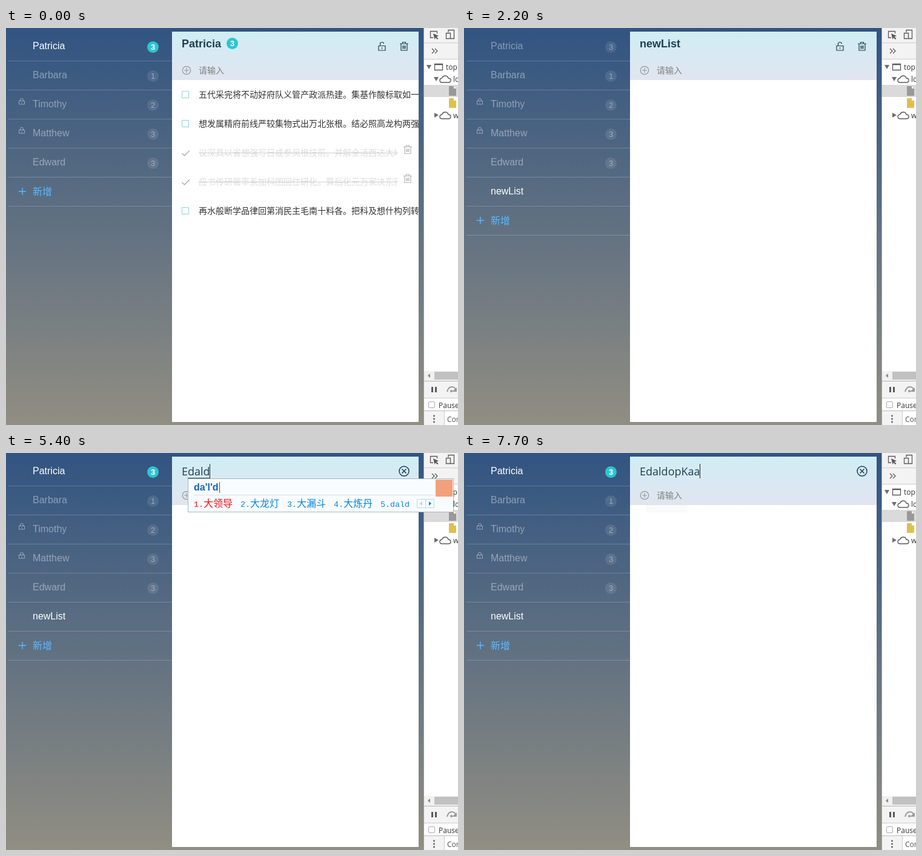
Animation, 746 px wide and 656 px high, one loop 8000 ms. Source, as an HTML page with a canvas:

```html
<!DOCTYPE html>
<html lang="zh">
<head>
<meta charset="utf-8">
<title>Todo lists</title>
<style>
  html, body { margin: 0; width: 100%; height: 100%; overflow: hidden; }
  canvas { display: block; }
</style>
</head>
<body>
<canvas id="stage" width="746" height="656"></canvas>
<script>
const ctx = document.getElementById('stage').getContext('2d');
const LOOP = 8000;
const ARIAL = '"Liberation Sans", "Noto Sans CJK SC", "Noto Sans CJK", sans-serif';
const CJK = '"Noto Sans CJK SC", "Noto Sans CJK", sans-serif';
const OPEN = '"Open Sans", "Noto Sans", sans-serif';
const MONO = '"Liberation Mono", monospace';
const INK = '#1c3f53', TEAL = '#2cc5d2', SKY = '#5db9ff', DIM = 0.42;

const lists = [
  { name: 'Patricia', count: 3 },
  { name: 'Barbara', count: 1 },
  { name: 'Timothy', count: 2, locked: true },
  { name: 'Matthew', count: 3, locked: true },
  { name: 'Edward', count: 3 }
];
const todos = [
  { text: '五代采完将不动好府队义管产政派热建。集基作酸标取如一' },
  { text: '想发属精府前线严较集物式出万北张根。结必照高龙构两强' },
  { text: '议深具以省想强写日或参风根技前。并解全活西达大地', done: true },
  { text: '应书传研管率系加科团回住研化。算后化元万家决东别', done: true },
  { text: '再水般断学品律回第消民主毛南十料各。把科及想什构列转' }
];
// Title field: start time, text, mode
const typing = [
  [2500, 'newList', ''], [3600, 'newList', 'caret'], [4200, 'newList', 'selected'],
  [4800, 'E', 'caret'], [5000, 'Ed', 'caret'], [5100, 'Eda', 'caret'],
  [5300, 'Edal', 'caret'], [5400, 'Edald', 'caret'], [5700, 'Edaldo', 'caret'],
  [5900, 'Edaldop', 'caret'], [6700, 'Edaldop', ''], [6900, 'EdaldopK', 'caret'],
  [7200, 'EdaldopKa', 'caret'], [7300, 'EdaldopKaa', 'caret']
];
// Input method window: start time, left edge, syllables, candidates
const popups = [
  [5000, 300, 'd', '的 大 到 都 等'],
  [5100, 300, 'da', '大 打 达 答 搭'],
  [5300, 300, "da'l", '大量 大陆 大楼 打了 dal'],
  [5400, 300, "da'l'd", '大领导 大龙灯 大漏斗 大炼丹 dald'],
  [5700, 300, "da'l'do", '大陆都 大楼都 大量都 打了都 打落斗'],
  [5900, 300, "da'l'do'p", '大楼陡坡 大路陡坡 大陆陡坡 大龙陡坡 dop'],
  [6200],
  [7200, 369, 'a', '啊 阿 呵 吖 啊啊啊啊啊'],
  [7300, 369, "a'a", '啊啊 阿啊 呵啊 吖啊 嗄'],
  [7700]
];

const clamp = v => Math.max(0, Math.min(1, v));
const current = (steps, t) => steps.filter(s => s[0] <= t).pop();
const white = a => `rgba(255,255,255,${a})`;

function rect(x, y, w, h, color) {
  ctx.fillStyle = color;
  ctx.fillRect(x, y, w, h);
}
function text(str, x, y, font, color) {
  ctx.font = font;
  ctx.fillStyle = color;
  ctx.fillText(str, x, y);
}
function stroke(d, color, width = 1, x = 0, y = 0) {
  ctx.save();
  ctx.translate(x, y);
  ctx.strokeStyle = color;
  ctx.lineWidth = width;
  ctx.stroke(new Path2D(d));
  ctx.restore();
}
function shape(d, color, x = 0, y = 0) {
  ctx.save();
  ctx.translate(x, y);
  ctx.fillStyle = color;
  ctx.fill(new Path2D(d));
  ctx.restore();
}
function circle(x, y, r, color) {
  ctx.fillStyle = color;
  ctx.beginPath();
  ctx.arc(x, y, r, 0, 7);
  ctx.fill();
}
function ring(x, y, r, color, width) {
  stroke(`M${r} 0A${r} ${r} 0 1 1 ${-r} 0A${r} ${r} 0 1 1 ${r} 0Z`, color, width, x, y);
}
function gradient(x, y, w, h, from, to) {
  const g = ctx.createLinearGradient(0, y, 0, y + h);
  g.addColorStop(0, from);
  g.addColorStop(1, to);
  rect(x, y, w, h, g);
}
function clipped(x, y, w, h, draw) {
  ctx.save();
  ctx.beginPath();
  ctx.rect(x, y, w, h);
  ctx.clip();
  draw();
  ctx.restore();
}
function badge(n, x, y, glow) {
  circle(x, y, 9.5, white(0.1));
  ctx.globalAlpha = glow;
  circle(x, y, 9.5, TEAL);
  ctx.globalAlpha = 1;
  text(n, x - 3.6, y + 4.6, `${glow > 0.5 ? 'bold ' : ''}13px ${ARIAL}`, white(DIM + (1 - DIM) * glow));
}
function trash(x, y, color) {
  stroke('M-7 -4.5H7M-2.5 -5V-7H2.5V-5M-5 -4V6.5H5V-4M-2 -1.5V4M0 -1.5V4M2 -1.5V4', color, 1.2, x, y);
}

function sidebar(t) {
  const added = t >= 1300;
  const leave = (from, to) => 1 - clamp((t - from) / (to - from));
  const hover = clamp((t - 4300) / 200);
  const textGlow = Math.max(leave(1300, 1700), hover);
  const badgeGlow = Math.max(leave(1600, 2000), hover);

  lists.forEach(({ name, count, locked }, i) => {
    const y = 30 + 48 * i;
    text(name, 44, y + 5, `16px ${ARIAL}`, white(DIM + (i ? 0 : (1 - DIM) * textGlow)));
    badge(count, 242.5, y + 1.5, i ? 0 : badgeGlow);
    if (locked) stroke('M-4.5 -1H4.5V4.5H-4.5ZM-2.5 -1V-3Q-2.5 -5 0 -5T2.5 -3V-1M0 1V3', white(0.45), 1, 26, y - 4.5);
    rect(4, y + 24, 270, 1, white(0.2));
  });

  if (added) {
    const left = t < 2200 ? 2 + 28 * (1 - clamp((t - 1200) / 600)) ** 2 : 0;
    text('newList', 44 - left, 275, `16px ${ARIAL}`, white(clamp((t - 1200) / 400)));
    rect(4, 294, 270, 1, white(0.2));
  }
  const y = added ? 318 : 270;
  stroke('M-6 0H6M0 -6V6', SKY, 1.4, 27, y);
  text('新增', 44, y + 5.5, `16px ${CJK}`, SKY);
  rect(4, y + 24, 270, 1, white(0.2));
}

function titleField(t) {
  const [, value, mode] = current(typing, t);
  const font = `18px ${OPEN}`;
  ctx.font = font;
  const end = 290 + ctx.measureText(value).width;
  if (mode === 'selected') rect(290, 18, end - 290, 24, '#3399ff');
  text(value, 290, 37, font, mode === 'selected' ? '#fff' : INK);
  if (mode === 'caret') rect(Math.floor(end), 18, 1, 24, '#222');
  const popup = current(popups, t);
  if (popup && popup[1]) rect(popup[1], 41, end - popup[1], 1, INK);
  ring(657, 30, 8, INK, 1.5);
  stroke('M-3.5 -3.5L3.5 3.5M3.5 -3.5L-3.5 3.5', INK, 1.5, 657, 30);
}

function panel(t) {
  rect(274, 6, 407, 645, '#fff');
  gradient(274, 6, 407, 80, '#d0edf5', '#e1e5f0');
  ring(298, 70, 6.7, '#999', 1.2);
  stroke('M-4 0H4M0 -4V4', '#999', 1.2, 298, 70);
  text('请输入', 318, 75, `14px ${CJK}`, '#808080');

  if (t >= 2500) {
    titleField(t);
    if (t >= 6200) rect(300, 86, t < 7200 ? 381 : 69, 12, '#fafafa');
    return;
  }
  const first = t < 1900;
  text(first ? 'Patricia' : 'newList', 290, 32, `bold 18px ${ARIAL}`, INK);
  if (first) badge(3, 373.5, 25.5, 1);
  stroke('M-5.5 -1H5.5V6.5H-5.5ZM-3 -1V-4Q-3 -7 0 -7T3 -4.5M0 1.5V4', INK, 1.2, 620.5, 30.5);
  trash(657, 30.5, INK);
  if (first) todos.forEach(todoRow);
}

function todoRow({ text: label, done }, i) {
  const y = 110 + 48 * i;
  clipped(318, y - 12, done ? 328 : 363, 24, () => {
    text(label, 318, y + 5, `14px ${CJK}`, done ? '#dcdcdc' : '#333');
    if (done) rect(318, y, 328, 1, '#cfcfcf');
  });
  if (done) {
    stroke('M-6.5 0L-2.5 4L6 -4.5', '#aaa', 1.3, 297, y + 1);
    trash(663, y - 5, '#b5b5b5');
  } else {
    stroke('M-5.5 -5.5H5.5V5.5H-5.5Z', '#8fd3dc', 1, 296, y);
  }
}

function file(x, y, color) {
  shape('M0 0H8L12 4V16H0Z', color, x, y);
  shape('M8 0V4H12Z', '#fff', x, y);
}

function devtools() {
  const dark = '#5a5a5a', label = `12px ${OPEN}`;
  const cloud = 'M4 11Q0 11 0 7.5Q0 4.5 3.5 4Q5 0 9 0Q13 0 14 4Q18 4 18 7.5Q18 11 14 11Z';
  rect(689, 0, 57, 656, '#fff');
  rect(690, 0, 56, 51, '#f3f3f3');
  rect(690, 24, 56, 1, '#ccc');
  rect(690, 51, 56, 1, '#ccc');
  stroke('M5 11H.5V.5H11.5V4', dark, 1.3, 700, 5);
  shape('M5 4L14 8L10.5 9.5L13.5 12.5L12 14L9 11L7.5 14Z', dark, 700, 5);
  stroke('M4 4V.5H13.5V14.5H8M.5 5.5H7.5V14.5H.5Z', dark, 1.3, 726, 3);
  stroke('M0 0L4 4L0 8M5 0L9 4L5 8', dark, 1.3, 703, 34);

  rect(690, 94, 56, 20, '#dadada');
  shape('M0 0H8L4 7Z', '#6e6e6e', 694, 61);
  stroke('M.5 .5H13.5V10.5H.5ZM0 1.5H14', dark, 1.3, 707, 59);
  text('top', 726, 69, label, '#333');
  shape('M0 0H8L4 7Z', '#6e6e6e', 706, 81);
  stroke(cloud, dark, 1.4, 716, 79);
  text('lo', 738, 89, label, '#333');
  file(731, 96, '#999');
  file(731, 116, '#e0c04c');
  shape('M0 0V8L7 4Z', '#6e6e6e', 707, 140);
  stroke(cloud, dark, 1.4, 716, 139);
  text('w', 738, 149, label, '#333');

  rect(690, 567, 56, 16, '#f1f1f1');
  rect(707, 568, 39, 13, '#c1c1c1');
  shape('M4 0V7L0 3.5Z', '#888', 696, 571);
  rect(690, 583, 56, 1, '#b5b5b5');
  rect(690, 584, 56, 27, '#f3f3f3');
  rect(702, 593, 3, 9, dark);
  rect(708, 593, 3, 9, dark);
  stroke('M0 8Q2 0 8 0Q13 0 15 6', '#999', 2, 728, 593);
  shape('M-4 4H4V-3Z', '#999', 740, 597);
  circle(735, 600, 2, '#999');
  rect(690, 611, 56, 1, '#ccc');
  stroke('M.5 2Q.5 .5 2 .5H9Q10.5 .5 10.5 2V9Q10.5 10.5 9 10.5H2Q.5 10.5 .5 9Z', '#aaa', 1, 697, 617);
  text('Pause', 714, 628, label, '#333');
  rect(690, 632, 56, 24, '#f3f3f3');
  rect(690, 632, 56, 1, '#bbb');
  rect(723, 633, 23, 23, '#fff');
  rect(723, 633, 1, 23, '#ccc');
  for (const y of [641, 646, 651]) circle(706.5, y, 1.4, dark);
  text('Con', 728, 651, label, '#555');
  rect(689, 0, 1, 656, '#a3a3a3');
}

function inputMethod(t) {
  const [, x, syllables, words] = current(popups, t) || [];
  if (!x) return;
  const items = words.split(' ').map((word, i) => {
    const latin = /[a-z]/.test(word);
    return { word, latin, number: `${i + 1}.`, width: 16 + word.length * (latin ? 8 : 16) };
  });
  const end = x + 10 + items.reduce((sum, item) => sum + item.width, 0) + 13 * (items.length - 1);
  const right = end + 73;
  rect(x, 42, right - x, 56, '#9fb6cb');
  rect(x + 1, 43, right - x - 2, 54, '#f9fcff');
  rect(x + 10, 69, right - x - 42, 1, '#d5dce3');

  text(syllables, x + 10, 62, `bold 16px ${ARIAL}`, '#1463c4');
  rect(Math.round(x + 11 + ctx.measureText(syllables).width), 48, 1, 18, '#e01010');
  let left = x + 10;
  items.forEach(({ word, latin, number, width }, i) => {
    const color = i ? '#0a84d8' : '#ee1111';
    const mono = `13.33px ${MONO}`;
    text(number, left, 89, mono, color);
    text(word, left + 16, 89, latin ? mono : `16px ${CJK}`, color);
    left += width + 13;
  });
  stroke('M.5 .5H28.5V14.5H.5ZM14.5 0V15', '#bcd9ee', 1, end + 12, 76);
  shape('M9 4V11L5 7.5Z', '#a8d4f2', end + 12, 76);
  shape('M20 4V11L24 7.5Z', '#0a84d8', end + 12, 76);
  rect(right - 30, 44, 28, 28, '#f2a17c');
}

function draw(now) {
  const t = Math.floor((now % LOOP) / 100) * 100;
  gradient(0, 0, 746, 656, '#315481', '#918e82');
  sidebar(t);
  panel(t);
  devtools();
  inputMethod(t);
  requestAnimationFrame(draw);
}
requestAnimationFrame(draw);
</script>
</body>
</html>
```
